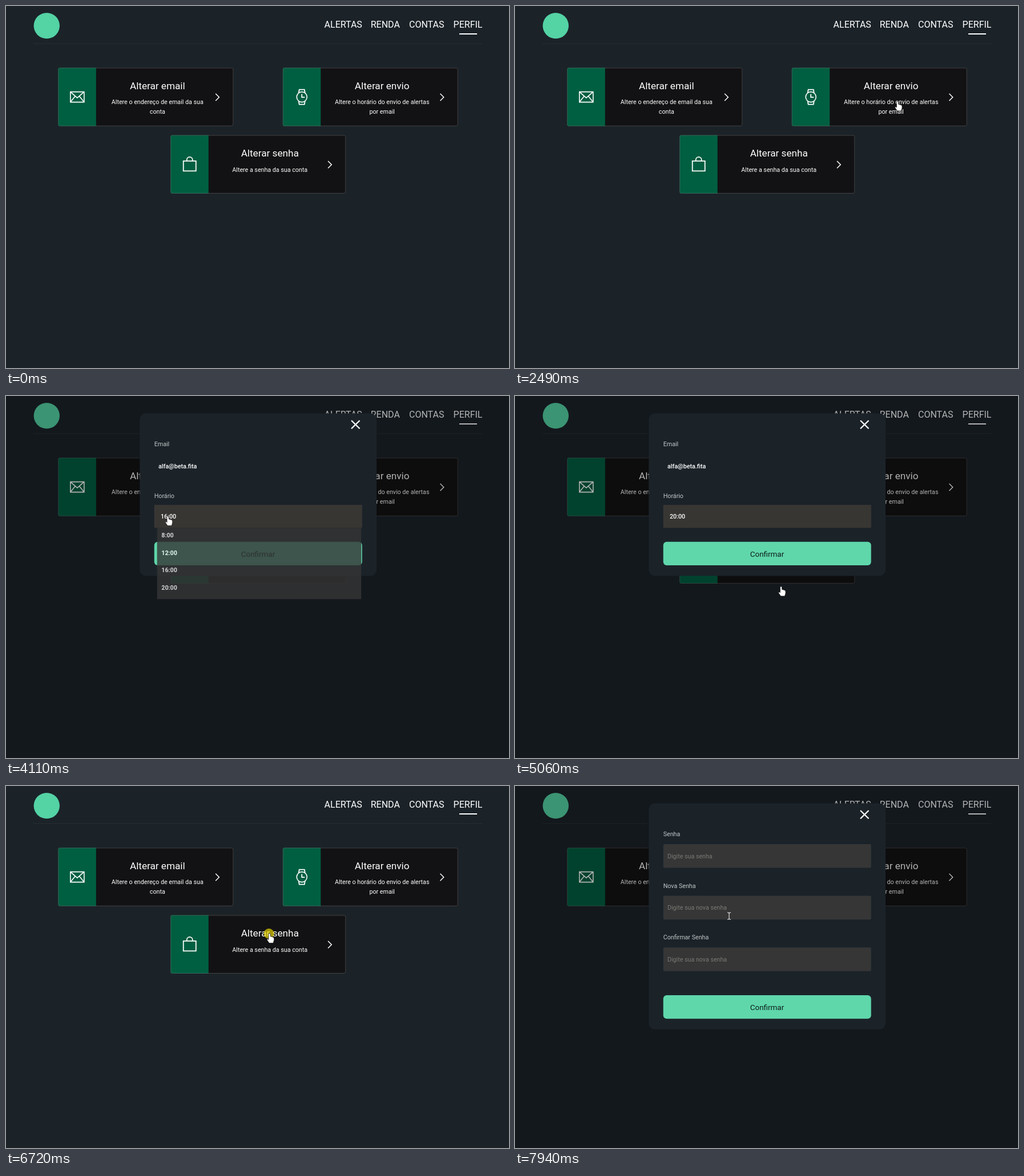
Animation of 881 by 635 pixels, one loop 8 s. Source, as an HTML page:

```html
<!DOCTYPE html>
<html lang="pt">
<head>
<meta charset="utf-8">
<title>Perfil</title>
<style>
  html, body { margin: 0; width: 100%; height: 100%; overflow: hidden; background: #1b2329; }
  svg { display: block; width: 881px; height: 635px; font: 10.7px Roboto, sans-serif; fill: #fff; }
  .nav { font-size: 16px; }
  .title { font-size: 17.15px; }
  .mid { text-anchor: middle; }
  .label { fill: #c3c7c9; }
  .hint { fill: #7b7a76; }
  .value { font-weight: 500; }
  .option { font-weight: 700; }
  .button { font-size: 13.45px; fill: #0d1b19; text-anchor: middle; }
  .line { fill: none; stroke: #fff; stroke-width: 1.6; }
</style>
</head>
<body>
<svg id="stage" viewBox="0 0 881 635"></svg>
<script>
const LOOP = 8000;
const text = (x, y, s, cls) => `<text x="${x}" y="${y}" class="${cls}">${s}</text>`;
const rect = (x, y, w, h, fill, r = 0) =>
  `<rect x="${x}" y="${y}" width="${w}" height="${h}" rx="${r}" fill="${fill}"/>`;
const line = (d, width = 1.6) => `<path class="line" d="${d}" style="stroke-width:${width}"/>`;

// Icons are drawn around the centre of the green panel.
const icons = {
  mail: line('M-12 -9H12V9H-12ZM-12 -9L0 1.5L12 -9M-12 9L-3.5 -1.5M12 9L3.5 -1.5'),
  watch: '<circle class="line" r="9"/>' +
    line('M-5.5 -7.5L-4.5 -13H4.5L5.5 -7.5M-5.5 7.5L-4.5 13H4.5L5.5 7.5M0 -5V.5H5', 1.8),
  bag: line('M-11 -6H11V11.5H-11ZM-5 -6V-8A5 5 0 0 1 5 -8V-6', 1.8)
};

const card = (x, y, icon, title, lines) => `<g transform="translate(${x} ${y})">
  ${rect(0, 0, 307, 102.5, '#121214', 3)}
  <path d="M66.5 0H3Q0 0 0 3V99.5Q0 102.5 3 102.5H66.5Z" fill="#005f41"/>
  <rect x=".5" y=".5" width="306" height="101.5" rx="2.5" fill="none" stroke="#77716f" stroke-opacity=".5"/>
  <g transform="translate(33.5 51.3)">${icons[icon]}</g>
  ${text(174, 37.7, title, 'title mid')}
  ${lines.map((s, i) => text(174, 64 + 17 * i, s, 'mid')).join('')}
  ${line('M275.8 45.5L282 51.7L275.8 58', 1.5)}</g>`;

const page = rect(0, 0, 881, 635, '#1b2329') +
  '<circle cx="71.3" cy="34.6" r="22.7" fill="#54d3a5"/>' +
  [['ALERTAS', 557.6], ['RENDA', 638.7], ['CONTAS', 706], ['PERFIL', 783.6]]
    .map(([s, x]) => text(x, 38.3, s, 'nav')).join('') +
  rect(794, 48, 31, 2, '#fff') + rect(48, 65.5, 787, 1, '#293137') +
  card(91.3, 108.3, 'mail', 'Alterar email', ['Altere o endereço de email da sua', 'conta']) +
  card(484.7, 108.3, 'watch', 'Alterar envio', ['Altere o horário do envio de alertas', 'por email']) +
  card(288.2, 226.5, 'bag', 'Alterar senha', ['Altere a senha da sua conta']);

const modal = (height, buttonY, body) => rect(0, 0, 881, 635, 'rgba(0,0,0,.3)') +
  rect(234.3, 30.5, 414.7, height, '#1b2329', 11) +
  line('M605 43L619.5 57.2M619.5 43L605 57.2', 2.3) + body +
  rect(259.7, buttonY, 364, 41.3, '#5fd7ab', 6) +
  text(441.5, buttonY + 26, 'Confirmar', 'button');

const scheduleModal = modal(285, 255.7,
  text(259.7, 88, 'Email', 'label') + text(267, 127, 'alfa@beta.fita', 'value') +
  text(259.7, 178.8, 'Horário', 'label') + rect(259.7, 191, 364, 40.3, '#383633', 1) +
  '<text id="hour" class="value" x="271" y="215"></text>');

const passwordModal = modal(396.5, 367,
  [['Senha', 'Digite sua senha'], ['Nova Senha', 'Digite sua nova senha'], ['Confirmar Senha', 'Digite sua nova senha']]
    .map(([label, hint], i) => {
      const y = 90.6 * i;
      return text(259.7, 88.2 + y, label, 'label') + rect(259.7, 102 + y, 364, 41.6, '#363636', 2) +
        text(267, 126.8 + y, hint, 'hint');
    }).join(''));

const menu = rect(264.6, 231.3, 357.6, 125, '#353535') +
  ['8:00', '12:00', '16:00', '20:00'].map((s, i) => text(272.3, 248 + 30.5 * i, s, 'option')).join('');

const pointers = {
  arrow: '<path stroke="#111" stroke-width=".7" d="M0 0V12L2.8 9.4L4.6 13.5L6.6 12.6L4.8 8.7H8.5Z"/>',
  hand: '<path stroke="#111" stroke-width=".7" d="M-1.6 1Q0 -1 1.6 1V5.3L6 6.5Q8 7 8 9V12L6.5 17H-.5L-4.3 11.5Q-4.6 9.4 -2.8 9.8L-1.6 11Z"/>',
  beam: line('M-3 -6H-1L0 -5L1 -6H3M0 -5V5M-3 6H-1L0 5L1 6H3', 1)
};

// Pointer path: time, x, y, shape used from that time on.
const path = [
  [1200, 785, 566, 'arrow'], [1400, 765, 410, 'arrow'], [1600, 722, 220, 'arrow'],
  [1700, 700, 140, 'hand'], [1830, 672, 75, 'arrow'], [1940, 661, 49, 'arrow'],
  [2140, 661, 49, 'arrow'], [2230, 705, 85, 'arrow'], [2320, 747, 125, 'hand'],
  [2410, 710, 160, 'hand'], [2490, 670, 167, 'hand'], [2560, 670, 167, 'hand'],
  [2720, 652, 168, 'hand'], [2920, 649, 172, 'hand'], [2980, 657, 188, 'arrow'],
  [3180, 657, 188, 'arrow'], [3400, 520, 205, 'hand'], [3620, 340, 215, 'hand'],
  [3780, 284, 211, 'hand'], [4180, 283.5, 210.5, 'hand'], [4350, 340, 255, 'hand'],
  [4650, 455, 328, 'hand'], [4720, 455, 328, 'hand'], [4850, 466, 334, 'hand'],
  [5130, 466, 334, 'hand'], [5200, 500, 300, 'arrow'], [5290, 545, 245, 'hand'],
  [5350, 570, 208, 'hand'], [5400, 585, 180, 'arrow'], [5470, 597, 155, 'arrow'],
  [5540, 604, 110, 'arrow'], [5680, 612, 52, 'hand'], [5980, 612, 52, 'arrow'],
  [6140, 560, 125, 'hand'], [6290, 500, 215, 'arrow'], [6400, 478, 238, 'hand'],
  [6640, 461.5, 258.5, 'hand'], [6850, 461.5, 258.5, 'arrow'], [7190, 475, 262, 'arrow'],
  [7310, 503, 275, 'arrow'], [7430, 460, 290, 'beam'], [7550, 395, 280, 'arrow'],
  [7700, 343, 257, 'arrow'], [7820, 357, 231, 'beam'], [7930, 375, 228, 'beam'],
  [LOOP, 375, 228, 'beam']
];
const clicks = [[2850, 2980], [3920, 4050], [4850, 4990], [5800, 5930], [6690, 6850]];

document.getElementById('stage').innerHTML = page +
  `<g id="schedule">${scheduleModal}</g><g id="menu">${menu}</g><g id="password">${passwordModal}</g>
  <g id="pointer"><circle id="click" cx="-1" cy=".5" r="9" fill="#e6d200" fill-opacity=".7"/>
  ${Object.entries(pointers).map(([name, shape]) => `<g id="${name}">${shape}</g>`).join('')}</g>`;

const el = id => document.getElementById(id);
const show = (id, on) => el(id).setAttribute('display', on ? 'inline' : 'none');
const between = (t, a, b) => t >= a && t < b;

function draw(t) {
  show('schedule', between(t, 2980, 5930));
  show('menu', between(t, 4050, 4990));
  show('password', t >= 6850);
  el('menu').setAttribute('opacity', t < 4180 ? .8 : 1);
  el('hour').textContent = t < 4990 ? '16:00' : '20:00';

  show('pointer', t >= path[0][0]);
  const i = path.findIndex((p, k) => k < path.length - 1 && between(t, p[0], path[k + 1][0]));
  if (i < 0) return;
  const [t0, x0, y0, shape] = path[i], [t1, x1, y1] = path[i + 1];
  const k = (t - t0) / (t1 - t0);
  el('pointer').setAttribute('transform', `translate(${x0 + (x1 - x0) * k} ${y0 + (y1 - y0) * k})`);
  Object.keys(pointers).forEach(name => show(name, name === shape));
  show('click', clicks.some(([a, b]) => between(t, a, b)));
}

const start = performance.now();
function tick() {
  draw((performance.now() - start) % LOOP);
  requestAnimationFrame(tick);
}
tick();
</script>
</body>
</html>
```
